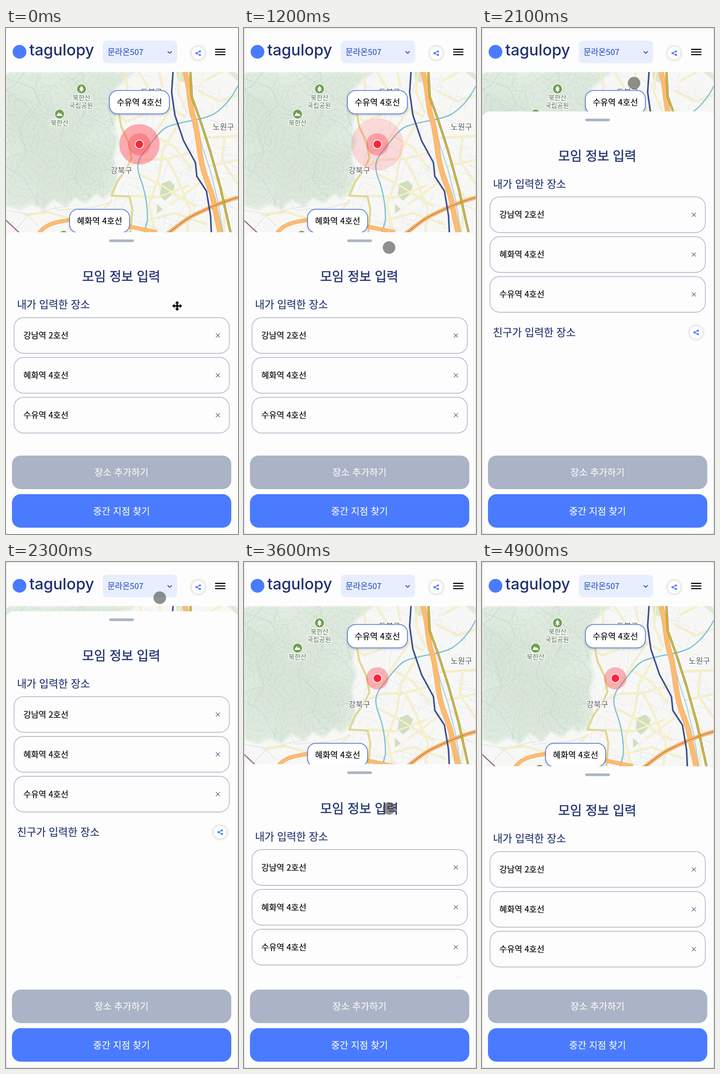
An HTML page that plays this animation: 507x1105 px, repeating every 5 s.

```html
<!DOCTYPE html>
<html lang="ko">
<head>
<meta charset="utf-8">
<title>모임 정보 입력</title>
<style>
html, body { margin: 0; width: 100%; height: 100%; overflow: hidden; background: #fdfdfd; }
svg { display: block; width: 100vw; height: 100vh; }
text { font-family: 'Noto Sans CJK KR', 'Noto Sans CJK', 'Noto Sans CJK SC', sans-serif; font-weight: 500; }
path { stroke-linejoin: round; }
</style>
</head>
<body>
<svg id="stage" viewBox="0 0 507 1105" preserveAspectRatio="none"></svg>
<script>
const LOOP = 5000, STEP = 100;
const NAVY = '#20326f', BLUE = '#4a7bff', SLATE = '#abb3c6';

// Text placed by its vertical middle.
const label = (s, x, mid, size, fill, anchor = 'middle', extra = '') =>
  `<text x="${x}" y="${(mid + size * .37).toFixed(1)}" font-size="${size}" fill="${fill}" text-anchor="${anchor}" ${extra}>${s}</text>`;
const line = (d, color, w, extra = '') =>
  `<path d="${d}" fill="none" stroke="${color}" stroke-width="${w}" ${extra}/>`;
const cased = (d, edge, fill, w, rim = 1.6) => line(d, edge, w) + line(d, fill, w - rim);
const area = (d, fill, extra = '') => `<path d="${d}" fill="${fill}" ${extra}/>`;
const bold = (color, w = .35) => `stroke="${color}" stroke-width="${w}"`;

function rng(seed) {
  return () => (seed = (seed * 16807) % 2147483647) / 2147483647;
}

const FOREST = 'M0 96H282L262 112 240 130 233 160 242 184 236 214 245 246 234 282 242 318 238 350 214 372 196 362 174 382 150 370 130 390 104 374 82 396 56 384 30 396 0 386Z';

// Jagged closed line at a given height around a peak.
function contour(cx, cy, r, k) {
  let d = '';
  for (let i = 0; i < 150; i++) {
    const a = i / 150 * Math.PI * 2;
    const ridge = .15 * Math.sin(5 * a + k * .3 + cy) + .09 * Math.sin(11 * a + cx + k * .2) + .05 * Math.sin(23 * a + k) + .03 * Math.sin(41 * a);
    const q = r * (1 + ridge);
    d += (i ? 'L' : 'M') + (cx + q * Math.cos(a)).toFixed(1) + ' ' + (cy + q * Math.sin(a) * 1.15).toFixed(1);
  }
  return d + 'Z';
}

function hills() {
  let s = '';
  [[100, 275, 11], [215, 140, 6], [30, 170, 6], [195, 320, 5]].forEach(([x, y, n]) => {
    for (let k = n; k > 0; k--) {
      s += area(contour(x, y, k * 13, k), '#bcd8c0', 'fill-opacity=".055" stroke="#b3cfb9" stroke-width=".8" stroke-opacity=".6"');
    }
  });
  return s;
}

function lanes() {
  const rand = rng(77);
  let d = '';
  for (let i = 0; i < 120; i++) {
    const x = 235 + rand() * 270, y = 96 + rand() * 350;
    const a = (rand() < .5 ? .35 : 1.9) + (rand() - .5) * .5, len = 14 + rand() * 34;
    d += `M${x.toFixed(0)} ${y.toFixed(0)}l${(len * Math.cos(a)).toFixed(0)} ${(len * Math.sin(a)).toFixed(0)}`;
  }
  return line(d, '#e6e7e7', 1.1) + line('M0 398L45 406 70 432M15 446L48 410 100 395 140 388M98 372L112 398 190 392 232 380M160 400L168 446', '#e0e2e2', 1.4);
}

function park(x, y, peak) {
  return `<circle cx="${x}" cy="${y}" r="10.5" fill="#6c9f52" stroke="#fff" stroke-width="1.2"/>` +
    (peak ? area(`M${x - 7} ${y + 4}l5-8 3 4 2-2 4 6z`, '#fff')
          : area(`M${x} ${y - 7}l5 7h-3l3 4h-4v3h-2v-3h-4l3-4h-3z`, '#fff'));
}

function mapArt() {
  const roads = 'M258 96L266 128 248 178M290 96L312 132 360 176 392 194M300 190L262 204 246 190' +
    'M360 178L330 222 304 262 266 276M375 212L342 268 334 326 312 386 326 446M272 300L300 288 350 286 412 270' +
    'M290 318L340 344 416 390M352 286L376 332 402 396 396 446M326 236L368 260 404 306M420 136L466 160 507 146' +
    'M428 240L507 236M442 302L507 288M454 322L480 368 476 446M358 386L416 344 440 320M272 366L330 370 400 344' +
    'M432 116L470 96M478 236L472 290 507 342M310 420L370 404 440 430M335 96L342 130M380 96L376 140 396 186' +
    'M200 410L232 376M40 408L92 402 140 416';
  const artery = 'M246 184L252 216 268 250 274 284 262 310 244 334 230 366 270 368 276 396 272 446';
  const river = 'M507 126C494 152 476 174 454 188C424 203 388 202 352 216C334 226 318 250 304 268C286 288 284 304 294 330C304 356 310 390 309 420L302 446';
  const highway = 'M391 96C402 128 400 160 408 190C420 224 420 262 429 300C436 334 452 356 456 392L469 452';
  const olive = 'M403 96L406 150 426 206 446 268 468 346 492 452';
  const ring = 'M507 370C470 380 440 394 412 408C386 420 370 438 348 452';
  const south = ring + 'M70 452C82 430 104 424 140 419S220 414 262 432L330 446';
  const halo = 'stroke="#fff" stroke-width="3" paint-order="stroke" stroke-linejoin="round"';
  const place = (s, x, y, size, c = '#53585c') => label(s, x, y, size, c, 'middle', halo);
  return `<rect y="96" width="507" height="370" fill="#f7f7f6"/>
    ${area(FOREST, '#e2ede2', 'stroke="#eaf1e9" stroke-width="6"')}
    <g clip-path="url(#forest)">${hills()}
      ${line('M0 110L60 132 76 168 132 200 118 244 160 286 150 330 186 372M120 96L150 116 222 170 236 220M70 170L30 220 44 270 10 330', '#a9bcab', .9, 'stroke-dasharray="3 2.5"')}
      ${line('M42 96L20 124 0 136M0 302L40 328 70 384M176 190L214 210 240 246', '#b9d9e2', 1.1)}
    </g>
    ${lanes()}
    ${area('M340 340L358 333 369 345 360 366 347 377 336 366Z', '#cfdfbf')}
    ${area('M330 384L343 396 330 405Z', '#cfdfbf')}
    ${area('M372 96H398L388 120 374 112Z', '#dbe8cf')}
    ${area('M484 96H507V116Z', '#dfead9')}
    ${cased(roads, '#e8dfa6', '#fcf6d2', 3.8)}
    ${cased(artery, '#cfc477', '#e9dd8c', 3.8)}
    ${line(river, '#7cbfd4', 2.6)}
    ${line('M415 204L430 262 446 310 462 374 474 446', '#9fd0e6', 2)}
    ${cased(highway, '#e7a55c', '#fdbb70', 11.5)}
    ${cased(south, '#e7a55c', '#fdbb70', 8.5)}
    ${line(ring, '#b5703a', 1.5)}
    ${cased(olive, '#8c812f', '#d9c64b', 4.6, 2.2)}
    ${line('M365 96L362 140 369 190 388 246 414 294 417 324 438 356 447 410 449 452', '#3c4f8f', 3.4)}
    ${line('M0 420L30 448', '#9b6b86', 2.4)}
    ${park(165, 133)}${park(117, 188, true)}
    <circle cx="126" cy="453" r="10" fill="#6c9f52"/>
    ${place('북한산', 165, 152, 14.2, '#4f6f4c')}${place('국립공원', 164, 169, 14.2, '#4f6f4c')}
    ${place('북한산', 117, 207, 14.2, '#4f6f4c')}
    ${place('도봉구', 318, 140, 17)}${place('노원구', 475, 216, 17)}${place('강북구', 252, 311, 17.2)}`;
}

const pill = (s, x, y) =>
  `<rect x="${x - 65.5}" y="${y - 25.5}" width="131" height="51" rx="18" fill="#fff" stroke="#4672d3" stroke-width="1.5" filter="url(#soft)"/>` +
  label(s, x, y, 18.2, '#000', 'middle', bold('#000', .2));

const share = (x, y) =>
  `<circle cx="${x}" cy="${y}" r="14" fill="#fff" filter="url(#glow)"/>
  <g transform="translate(${x} ${y})">${line('M4-4L-4 0 4 4', BLUE, 1.6)}
  ${[[3.8, -3.8], [-3.8, 0], [3.8, 3.8]].map(([cx, cy]) => `<circle cx="${cx}" cy="${cy}" r="2.3" fill="${BLUE}"/>`).join('')}</g>`;

const card = (s, i) => {
  const y = 632.5 + i * 87, m = y + 39;
  return `<rect x="17.5" y="${y}" width="470.5" height="78" rx="21" fill="#fdfdfd" stroke="#a9b0c4" stroke-width="1.4"/>` +
    label(s, 38, m, 18.1, '#000', 'start', bold('#000', .2)) +
    line(`M458.7 ${m - 4.3}l8.6 8.6m0-8.6l-8.6 8.6`, '#3c4980', 1.1);
};

const button = (s, y, fill) =>
  `<rect x="13" y="${y}" width="479.3" height="73.3" rx="19" fill="${fill}"/>` +
  label(s, 252.5, y + 37, 20.4, '#f9fafc', 'middle', bold('#f9fafc', .2));

const stage = document.getElementById('stage');
stage.innerHTML = `
<defs>
  <clipPath id="map"><path d="M0 106Q0 96 10 96H497Q507 96 507 106V466H0Z"/></clipPath>
  <clipPath id="forest"><path d="${FOREST}"/></clipPath>
  <clipPath id="body"><rect y="97" width="507" height="811"/></clipPath>
  <filter id="soft" x="-10%" y="-20%" width="120%" height="150%"><feDropShadow dx="0" dy="2" stdDeviation="2" flood-opacity=".22"/></filter>
  <filter id="glow" x="-50%" y="-50%" width="200%" height="200%"><feDropShadow dx="0" dy="0" stdDeviation="3" flood-opacity=".3"/></filter>
</defs>
<rect width="507" height="1105" fill="#fdfdfd"/>
<g clip-path="url(#map)">${mapArt()}
  <circle id="ping" cx="291.5" cy="254" fill="#ff4050"/>
  <circle cx="291.5" cy="254" r="24.3" fill="#ff4050" fill-opacity=".38"/>
  <circle cx="291.5" cy="254" r="9.3" fill="#fb2439" stroke="#fff" stroke-width="1.8"/>
  ${pill('수유역 4호선', 291.5, 162)}${pill('혜화역 4호선', 204.5, 421.5)}
</g>
<g clip-path="url(#body)"><g id="sheet">
  <rect y="446" width="507" height="1100" rx="17" fill="#fdfdfd"/>
  <rect x="225.5" y="461.8" width="54" height="5.6" rx="2.8" fill="${SLATE}"/>
  ${label('모임 정보 입력', 252, 543, 28.1, NAVY, 'middle', bold(NAVY, .5))}
  ${label('내가 입력한 장소', 24, 604, 22.8, NAVY, 'start', bold(NAVY, .2))}
  ${['강남역 2호선', '혜화역 4호선', '수유역 4호선'].map(card).join('')}
  ${label('친구가 입력한 장소', 24, 928.5, 22.8, NAVY, 'start', bold(NAVY, .2))}
  ${share(468, 928.5)}
</g></g>
<rect y="908" width="507" height="197" fill="#fdfdfd"/>
${button('장소 추가하기', 933.7, SLATE)}${button('중간 지점 찾기', 1018, BLUE)}
<circle cx="29.5" cy="52" r="15" fill="${BLUE}"/>
<text x="51" y="60" font-size="34" fill="${NAVY}" style="font-family:Inter,sans-serif">tagulopy</text>
<rect x="211.5" y="27.5" width="162.5" height="49.5" rx="9" fill="#e8eefd"/>
${label('문라온507', 222, 52, 17.7, '#2f58c4', 'start', bold('#2f58c4', .2))}
${line('M353.3 51l4.4 4.3 4.4-4.3', '#2f58c4', 2)}
${share(420, 55)}
${line('M457 46.7h22.5M457 52.4h22.5M457 58.1h22.5', '#000', 2.4)}
<rect id="frame" x=".5" y=".5" width="506" height="1104" fill="none" stroke="#d6d6d6"/>
<circle id="touch" r="13.7" fill="#464646" fill-opacity=".6"/>
<g id="mover">${['#fff', '#000'].map((c, i) =>
    `<path d="M0-10.5L4-6H1.3V-1.3H6V-4L10.5 0 6 4V1.3H1.3V6H4L0 10.5-4 6H-1.3V1.3H-6V4L-10.5 0-6-4V-1.3H-1.3V-6H-4Z" fill="${c}" stroke="${c}" stroke-width="${i ? .5 : 2}"/>`).join('')}</g>`;

const [ping, sheet, frame, touch, mover] =
  ['ping', 'sheet', 'frame', 'touch', 'mover'].map(id => document.getElementById(id));

const smooth = p => p * p * (3 - 2 * p);
const linear = p => p;
// time, x, y, easing towards the point
const track = [
  [0, 374, 607], [700, 334, 474, smooth], [1700, 300, 485, smooth],
  [2200, 336, 78, smooth], [2750, 336, 78, linear], [3500, 320, 480.5, linear],
  [3600, 317, 538, linear], [4200, 300, 857, linear]
];

function pointer(t) {
  const i = track.findIndex(k => k[0] >= t);
  if (i < 0) return track[track.length - 1].slice(1, 3);
  if (i === 0) return track[0].slice(1, 3);
  const a = track[i - 1], b = track[i], p = b[3]((t - a[0]) / (b[0] - a[0]));
  return [a[1] + (b[1] - a[1]) * p, a[2] + (b[2] - a[2]) * p];
}

// cubic-bezier(0, 0, .2, 1)
function easeOut(x) {
  let lo = 0, hi = 1;
  for (let i = 0; i < 20; i++) {
    const m = (lo + hi) / 2;
    if (.6 * m * m + .4 * m * m * m < x) lo = m; else hi = m;
  }
  return smooth(lo);
}

const show = (el, on) => el.setAttribute('visibility', on ? 'visible' : 'hidden');

function draw(t) {
  const p = easeOut(Math.min(1, (t + 90) % 1000 / 750));
  ping.setAttribute('r', 32.7 * (1 + p));
  ping.setAttribute('opacity', p > .98 ? 0 : .65 * (1 - p));

  const [x, y] = pointer(t);
  touch.setAttribute('cx', x);
  touch.setAttribute('cy', y);
  mover.setAttribute('transform', `translate(${x} ${y})`);
  show(mover, t < 600);
  show(touch, t >= 600 && t < 4900);
  show(frame, t >= 900);

  // The sheet trails the finger a little and stops at both ends.
  const pull = t < 1800 ? 0 : Math.max(-338.5, Math.min(0, pointer(t - 100)[1] - 485));
  sheet.setAttribute('transform', `translate(0 ${pull})`);
}

const start = performance.now();
function tick() {
  const t = (performance.now() - start) % LOOP;
  draw(Math.floor(t / STEP) * STEP);
  requestAnimationFrame(tick);
}
draw(0);
requestAnimationFrame(tick);
</script>
</body>
</html>
```
